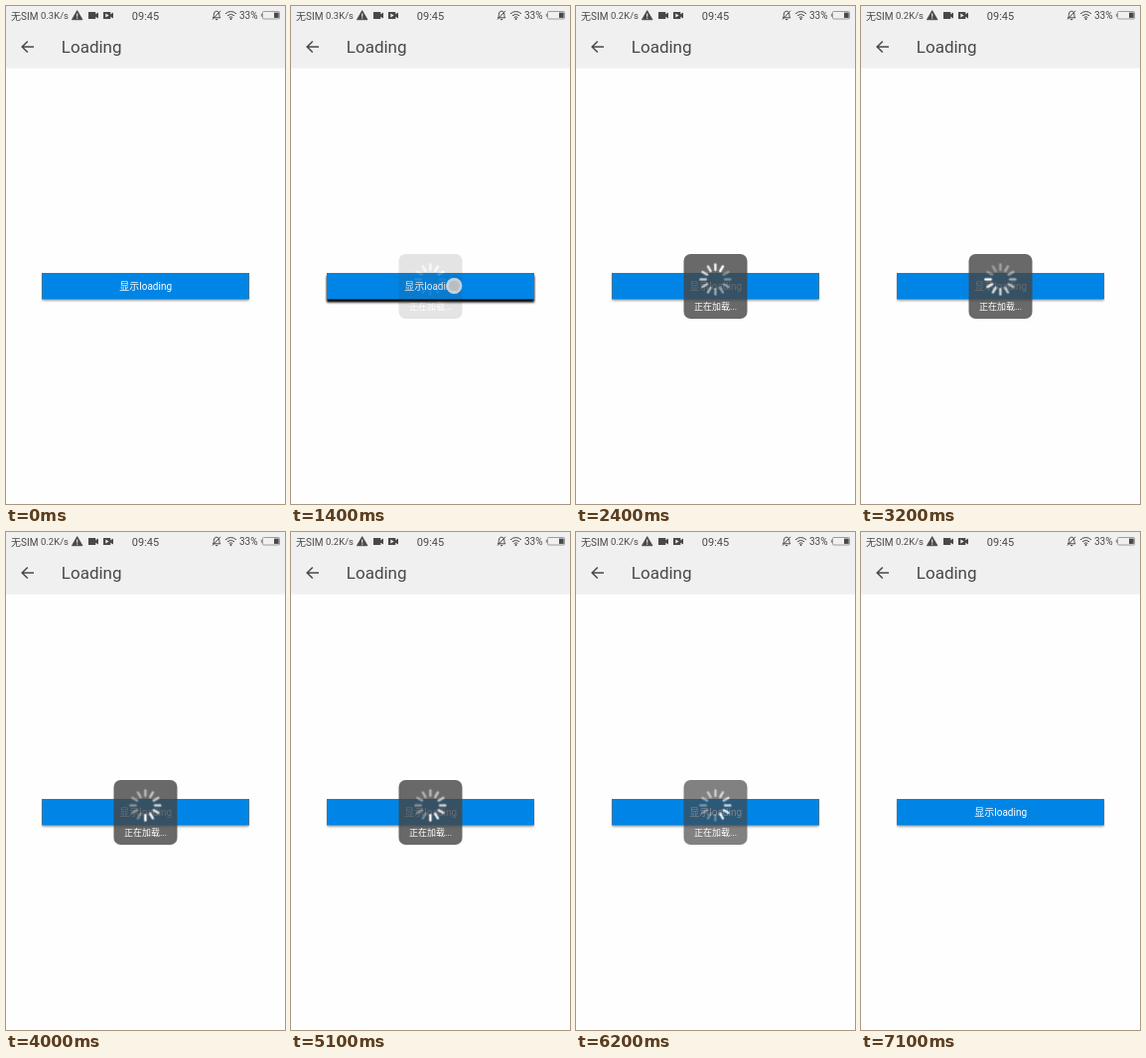
An HTML page that plays this animation: 281 by 500 pixels, repeating every 7200 ms.

```html
<!DOCTYPE html>
<html lang="zh-CN">
<head>
<meta charset="utf-8">
<title>Loading</title>
<style>
  html, body { margin: 0; width: 100%; height: 100%; overflow: hidden; background: #fefefe; }
  svg { display: block; width: 100vw; height: 100vh; }
  text { font-family: Roboto, "Noto Sans CJK SC", "Noto Sans CJK", sans-serif; fill: #484848; }
  .button { fill: #fff; font-size: 10px; }
  .hint { fill: #fff; font-size: 9px; }
  .shadow { filter: blur(1.2px); }

  .hud, .touch, .fast, .slow { animation: 7200ms step-end infinite; }
  .hud { animation-name: hud; }
  .touch { animation-name: touch; }
  .fast { animation-name: fast; }
  .slow { animation-name: slow; }
  .spin { animation: spin 7200ms steps(77) -6038ms infinite; }

  @keyframes hud {
    0% { opacity: 0; }
    19.4% { opacity: .17; }
    20.8% { opacity: .6; }
    22.2% { opacity: .9; }
    23.6% { opacity: 1; }
    86.1% { opacity: .84; }
    87.5% { opacity: .45; }
    88.8% { opacity: .12; }
    90.2%, 100% { opacity: 0; }
  }
  @keyframes touch {
    0% { opacity: 0; }
    16.6% { opacity: 1; }
    20.8%, 100% { opacity: 0; }
  }
  @keyframes fast {
    0% { opacity: 1; }
    26.3%, 100% { opacity: 0; }
  }
  @keyframes slow {
    0% { opacity: 0; }
    26.3%, 100% { opacity: 1; }
  }
  @keyframes spin {
    from { transform: rotate(0deg); }
    to { transform: rotate(2310deg); }
  }
</style>
</head>
<body>
<svg viewBox="0 0 281 500" preserveAspectRatio="none">
  <rect width="281" height="500" fill="#fefefe"/>
  <rect width="281" height="62.5" fill="#f0f0f0"/>

  <!-- status bar -->
  <text x="5" y="13.5" font-size="10">无SIM</text>
  <g font-size="9.5">
    <text class="fast" x="35" y="13.3">0.3K/s</text>
    <text class="slow" x="35" y="13.3">0.2K/s</text>
  </g>
  <g fill="#484848">
    <path d="M71.7 4.6 77 13.7H66.4Z" stroke="#484848" stroke-linejoin="round" stroke-width=".8"/>
    <path d="M71.7 7.5v3.2M71.7 11.6v1.1" stroke="#f0f0f0" stroke-width="1.1"/>
    <path d="M83 6h7.3v2.2L93 6.5v6L90.300 10.800V13H83Z"/>
    <path d="M98 6h7.300v2.200L108 6.500v6l-2.700-1.700V13H98Z"/>
    <path d="M100.300 7.400v4.200l3.300-2.100Z" fill="#f0f0f0"/>
  </g>
  <text x="126.800" y="13.600" font-size="11">09:45</text>
  <g fill="none" stroke="#484848" stroke-width="1">
    <path d="M208.300 11.800h7.600c-1-1-1.100-2-1.100-3.600 0-4-5.400-4-5.400 0 0 1.600-.1 2.600-1.100 3.600ZM211 13.600h2.200M208 13.500l8-8.700"/>
    <path d="M221 7.800q5.500-4.600 11 0M222.900 9.700q3.600-2.900 7.200 0M224.700 11.500q1.800-1.400 3.600 0"/>
    <rect x="258.500" y="5.500" width="17" height="7.500" rx="1" stroke="#888" stroke-width=".8"/>
  </g>
  <circle cx="226.500" cy="13" r="1" fill="#484848"/>
  <rect x="270" y="6.600" width="4.700" height="5.300" fill="#484848"/>
  <rect x="256.800" y="7.700" width="1.300" height="3" fill="#888"/>
  <text x="235" y="13.400" font-size="10">33%</text>

  <!-- title bar -->
  <path d="M28 41H16.500M21.800 35.500 16.200 41l5.600 5.500" fill="none" stroke="#484848" stroke-width="1.500"/>
  <text x="55.800" y="47" font-size="17">Loading</text>

  <!-- button -->
  <rect class="shadow" x="36.500" y="270" width="208" height="26" fill="#000" opacity=".35"/>
  <rect class="shadow touch" x="36" y="271" width="209" height="26.500" fill="#000" opacity=".2"/>
  <rect x="36" y="268" width="209" height="26.500" fill="#0085e6"/>
  <path d="M36.500 294V268.500H244.500V294" fill="none" stroke="#3f7599"/>
  <text class="button" x="114.300" y="285.300">显示loading</text>

  <g class="hud">
    <rect x="108.500" y="249" width="64" height="65" rx="7" fill="#444" fill-opacity=".8"/>
    <g transform="translate(140.400 274.500)">
      <g class="spin" id="spokes" stroke="#fff" stroke-width="2.500" stroke-linecap="round"></g>
    </g>
    <text class="hint" x="119" y="305">正在加载...</text>
  </g>

  <g class="touch">
    <circle cx="164.300" cy="281" r="8" fill="#e4e4e4" fill-opacity=".85"/>
    <circle cx="164.300" cy="281" r="5.500" fill="#b9bec2"/>
    <circle cx="164.300" cy="281" r="7.500" fill="none" stroke="#c4c8cb" stroke-width=".8"/>
  </g>
</svg>
<script>
  // The tail fades counter-clockwise behind the leading spoke.
  const spokes = document.getElementById("spokes");
  for (let i = 0; i < 12; i++) {
    const line = document.createElementNS(spokes.namespaceURI, "line");
    line.setAttribute("y1", -9.7);
    line.setAttribute("y2", -15);
    line.setAttribute("transform", `rotate(${-30 * i})`);
    line.setAttribute("opacity", 0.32 + 0.68 * (1 - i / 11) ** 1.5);
    spokes.append(line);
  }
</script>
</body>
</html>
```
